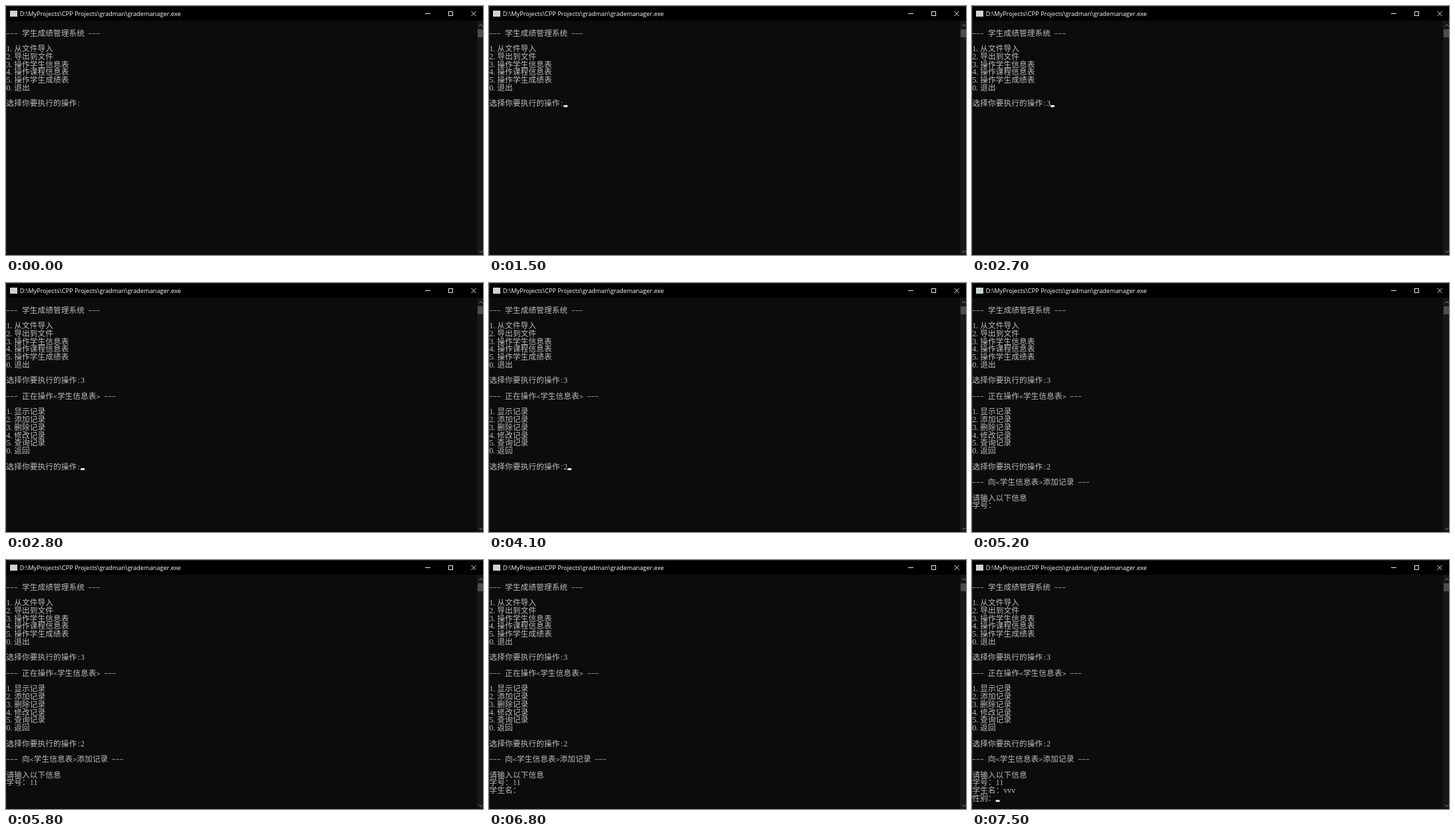
An HTML page with a canvas that plays this animation: 716x374 px, repeating every 8 s.

```html
<!DOCTYPE html>
<html lang="zh-CN">
<head>
<meta charset="utf-8">
<title>Console</title>
<style>
  html, body { margin: 0; height: 100%; overflow: hidden; background: #000; }
  canvas { display: block; }
</style>
</head>
<body>
<canvas id="stage" width="716" height="374"></canvas>
<script>
const ctx = document.getElementById('stage').getContext('2d');
const LOOP = 8000;
const CELL = 5.87, ROW = 11.75, LEFT = 0.5, TOP = 22.7;

const PROMPT = '\n\n选择你要执行的操作:';

// Console output and keystrokes: [time, appended text]
const output = [
  [0, '\n--- 学生成绩管理系统 ---\n\n1.从文件导入\n2.导出到文件\n3.操作学生信息表\n' +
      '4.操作课程信息表\n5.操作学生成绩表\n0.退出' + PROMPT],
  [2700, '3'],
  [2800, '\n\n--- 正在操作<学生信息表> ---\n\n1.显示记录\n2.添加记录\n3.删除记录\n' +
         '4.修改记录\n5.查询记录\n0.返回' + PROMPT],
  [4100, '2'],
  [4200, '\n\n--- 向<学生信息表>添加记录 ---\n\n请输入以下信息\n学号：'],
  [5600, '11'],
  [5900, '\n学生名：'],
  [7000, 'v'], [7100, 'v'], [7200, 'v'],
  [7500, '\n性别：']
];

// The cursor starts hidden and flips at each of these times
const blinks = [500, 1000, 1500, 2100, 2600, 3600, 4100, 5200, 5900, 6800, 7000, 7400, 7500];

function rect(color, x, y, w, h) {
  ctx.fillStyle = color;
  ctx.fillRect(x, y, w, h);
}

function stroke(color, ...lines) {
  ctx.strokeStyle = color;
  ctx.lineWidth = 1;
  ctx.beginPath();
  for (const [start, ...rest] of lines) {
    ctx.moveTo(...start);
    rest.forEach(p => ctx.lineTo(...p));
  }
  ctx.stroke();
}

function drawWindow() {
  rect('#0c0c0c', 0, 0, 716, 374);
  rect('#000', 0, 0, 716, 22);
  rect('#262626', 0, 0, 716, 1);
  rect('#222', 0, 0, 1, 374);
  rect('#cbd5d3', 6, 7, 11, 9);

  ctx.font = '9.2px "Open Sans", sans-serif';
  ctx.textAlign = 'left';
  ctx.fillStyle = '#fff';
  ctx.fillText('D:\\MyProjects\\CPP Projects\\gradman\\grademanager.exe', 20.7, 15);

  stroke('#e6e6e6', [[629, 11.5], [637, 11.5]],
    [[698.5, 8], [705.5, 15]], [[705.5, 8], [698.5, 15]]);
  ctx.strokeRect(664.5, 8.5, 6, 6);

  rect('#171717', 707, 22, 9, 352);
  rect('#4d4d4d', 708, 35, 8, 12);
  stroke('#8a8a8a', [[710, 30.5], [712.8, 27.7], [715.6, 30.5]],
    [[710, 367.5], [712.8, 370.3], [715.6, 367.5]]);
}

function drawChar(ch, x, y) {
  const wide = ch > '\u2e80';
  const sign = '-<>'.includes(ch);
  ctx.font = wide ? '300 11.6px "Noto Sans CJK SC", "Noto Sans CJK", sans-serif'
    : sign ? '9.8px "Liberation Mono", monospace'
    : '11.75px "Liberation Serif", serif';
  const left = ch === '.';
  ctx.textAlign = left ? 'left' : 'center';
  ctx.fillText(ch === '-' ? '−' : ch, x + (left ? 0 : wide ? CELL : CELL / 2), y + 10.2);
  return wide ? 2 : 1;
}

function drawConsole(t) {
  const text = output.filter(([at]) => t >= at).map(([, s]) => s).join('');
  let col = 0, row = 0;
  ctx.fillStyle = '#bdbdbd';
  for (const ch of text) {
    if (ch === '\n') { col = 0; row++; }
    else col += ch === ' ' ? 1 : drawChar(ch, LEFT + col * CELL, TOP + row * ROW);
  }
  if (blinks.filter(at => t >= at).length % 2)
    rect('#f2f2f2', LEFT + col * CELL, TOP + row * ROW + 8.7, CELL, 2.9);
}

function frame() {
  drawWindow();
  drawConsole(performance.now() % LOOP);
  requestAnimationFrame(frame);
}
frame();
</script>
</body>
</html>
```
